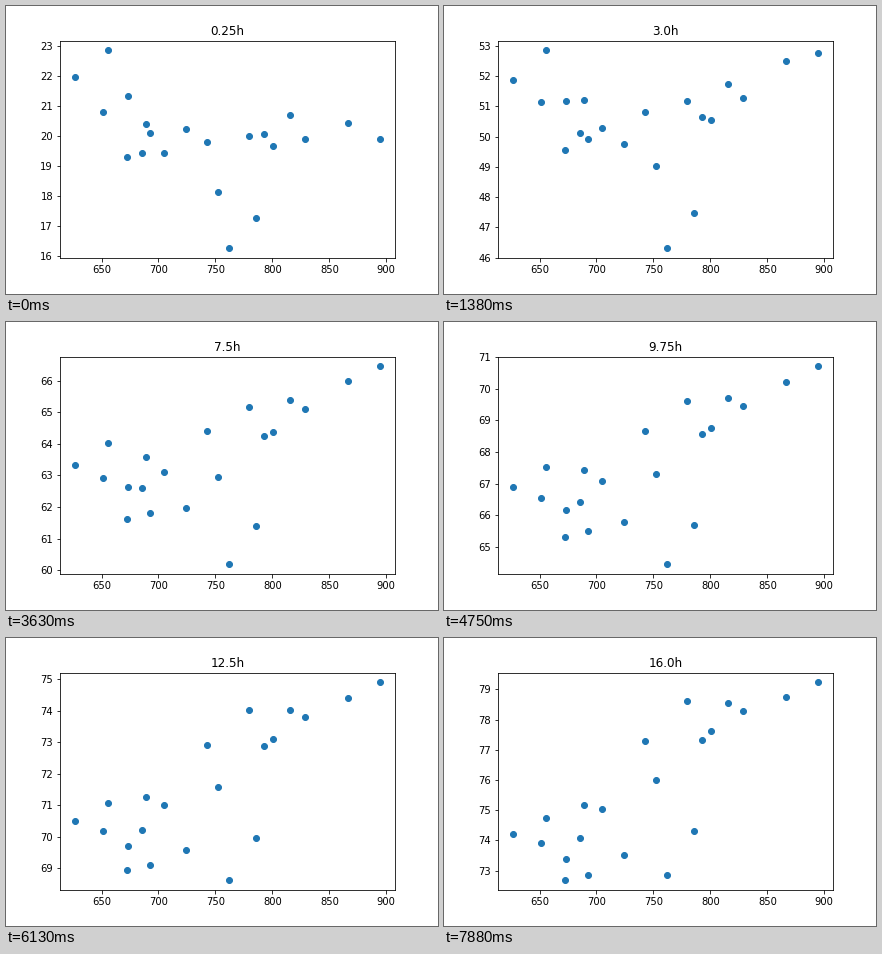
Write a matplotlib script that moves like this. It is 432 px wide and 288 px high and loops after 8000 ms.

```python
import numpy as np
import matplotlib.pyplot as plt
from matplotlib.animation import FuncAnimation

FRAMES, LOOP_MS, STEP_H = 64, 8000, 0.25
T_START, T_KEY = 0.25, 9.75

# One dot each: x, level at T_START, level at T_KEY
DOTS = [
    (626.92, 21.96, 66.91), (651.5, 20.79, 66.56), (655.8, 22.84, 67.54),
    (672.5, 19.29, 65.33), (673.5, 21.33, 66.18), (685.7, 19.42, 66.43),
    (689.2, 20.39, 67.44), (692.7, 20.09, 65.49), (705.0, 19.42, 67.09),
    (724.3, 20.23, 65.80), (742.7, 19.79, 68.67), (752.3, 18.12, 67.31),
    (762.0, 16.25, 64.46), (779.5, 19.99, 69.61), (785.6, 17.25, 65.71),
    (792.6, 20.06, 68.57), (800.5, 19.66, 68.76), (815.5, 20.69, 69.71),
    (828.6, 19.89, 69.46), (866.4, 20.43, 70.21), (894.1, 19.89, 70.70),
]
x, first, key = np.array(DOTS).T
rise = key - first
sag = 0.62 * rise - 19.9 + 2.7 * np.cos(np.pi * (x - 787) / 132)
skew = 2 * (first - 16)


def level(hours):
    """Growth along log time, bent below the straight line by sag and skew."""
    p = np.log(hours / T_START) / np.log(T_KEY / T_START)
    bend = sag + skew * (p - 0.95)
    return first + rise * p - bend * p * (1 - p)


fig, ax = plt.subplots(figsize=(6, 4), dpi=72)
fig.subplots_adjust(left=0.125, right=0.9, bottom=0.125, top=0.88)


def update(i):
    hours = (i + 1) * STEP_H
    ax.clear()
    ax.scatter(x, level(hours))
    ax.set_title(f"{hours}h")


anim = FuncAnimation(fig, update, frames=FRAMES, init_func=lambda: None,
                     interval=LOOP_MS / FRAMES, repeat=True)
plt.show()
```
